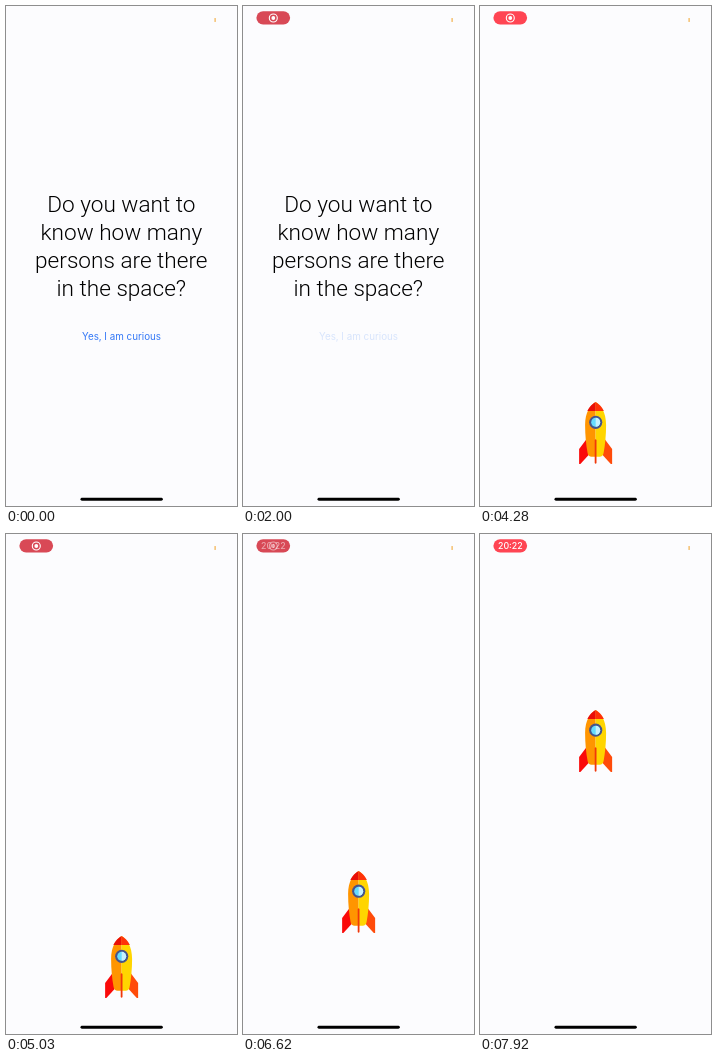
Animation, 231 px wide and 500 px high, one loop 8000 ms. Source, as an HTML page with a canvas:

```html
<!DOCTYPE html>
<html lang="en">
<head>
<meta charset="utf-8">
<title>Rocket</title>
<style>
html, body { margin: 0; width: 100%; height: 100%; overflow: hidden; background: #fcfcfe; }
canvas { display: block; width: 231px; height: 500px; }
</style>
</head>
<body>
<canvas id="stage"></canvas>
<script>
const W = 231, H = 500, LOOP = 8000;
const CUT = 3400; // question gives way to the rocket
const canvas = document.getElementById('stage');
const ctx = canvas.getContext('2d');
const scale = window.devicePixelRatio || 1;
canvas.width = Math.round(W * scale);
canvas.height = Math.round(H * scale);

const LINES = ['Do you want to', 'know how many', 'persons are there', 'in the space?'];

// time in ms, y of the rocket's tip
const PATH = [
  [3400, 409], [3580, 389], [3900, 403], [4280, 396], [4700, 404], [5070, 401],
  [5680, 375], [5780, 371], [5960, 343], [6300, 341], [6620, 337], [6800, 303],
  [7640, 203], [7920, 176], [8000, 167]
];

const clamp = x => Math.min(1, Math.max(0, x));
const ramp = (t, a, b) => {
  const x = clamp((t - a) / (b - a));
  return x * x * (3 - 2 * x);
};
const mix = (a, b, k) => a + (b - a) * k;

function slope(i) {
  const a = PATH[Math.max(0, i - 1)], b = PATH[Math.min(PATH.length - 1, i + 1)];
  return (b[1] - a[1]) / (b[0] - a[0]);
}

function rocketY(t) {
  let i = 0;
  while (i < PATH.length - 2 && t >= PATH[i + 1][0]) i++;
  const [t0, y0] = PATH[i], [t1, y1] = PATH[i + 1];
  const d = t1 - t0, u = (t - t0) / d, v = 1 - u;
  return y0 * (1 + 2 * u) * v * v + y1 * u * u * (3 - 2 * u)
    + d * u * v * (slope(i) * v - slope(i + 1) * u);
}

function pill(x, y, w, h, color) {
  ctx.fillStyle = color;
  ctx.beginPath();
  ctx.roundRect(x, y, w, h, h / 2);
  ctx.fill();
}

function disc(x, y, r, color) {
  ctx.fillStyle = color;
  ctx.beginPath();
  ctx.arc(x, y, r, 0, Math.PI * 2);
  ctx.fill();
}

function shape(path, color) {
  ctx.fillStyle = color;
  ctx.fill(new Path2D(path));
}

function text(str, x, y, font, color) {
  ctx.font = font;
  ctx.fillStyle = color;
  ctx.textAlign = 'center';
  ctx.fillText(str, x, y);
}

function statusBar(t) {
  pill(208.5, 12, 1.2, 4, '#f3b04a');
  const shown = ramp(t, 10, 260);
  if (!shown) return;
  const u = (t + 3700) % 4000;
  const dim = ramp(u, 0, 800) - ramp(u, 2600, 3400);
  const rgb = [mix(255, 216, dim), mix(69, 73, dim), mix(83, 86, dim)].map(Math.round);
  ctx.globalAlpha = shown;
  pill(13.4, 5.2, 33.7, 13.3, `rgb(${rgb})`);

  const clock = ramp(t, 6350, 6890);
  ctx.globalAlpha = shown * (1 - clock);
  ctx.strokeStyle = '#fff';
  ctx.lineWidth = 1.1;
  ctx.beginPath();
  ctx.arc(30.3, 12, 4, 0, Math.PI * 2);
  ctx.stroke();
  disc(30.3, 12, 1.9, '#fff');
  ctx.globalAlpha = shown * clock;
  text('20:22', 30.3, 15.1, '500 8.8px Inter, sans-serif', '#fff');
  ctx.globalAlpha = 1;
}

function question(t) {
  LINES.forEach((line, i) =>
    text(line, 115.3, 205.7 + 28 * i, '300 22.6px Roboto, sans-serif', '#000'));
  const pressed = ramp(t, 1780, 1960) - ramp(t, 2500, 3000);
  ctx.globalAlpha = 1 - 0.82 * pressed;
  text('Yes, I am curious', 115.5, 334.2, '400 9.8px Inter, sans-serif', '#3478f6');
  ctx.globalAlpha = 1;
}

// drawn around x = 0 with its tip at y = 0
function rocket(y) {
  ctx.save();
  ctx.translate(115.6, y);
  shape('M-9 37 L-16.5 47 V62 H-15.2 L-7 53 Z', '#fa0a0a');
  shape('M9 37 L16.5 47 V62 H15.2 L7 53 Z', '#ff4b0a');
  const half = 'C-5 3 -10.5 10 -10.5 23 C-10.5 33 -9.5 43 -8 51 Q-7.4 54.6 -4 54.8 H0 Z';
  const body = new Path2D('M0 0 ' + half);
  const mirrored = new Path2D();
  mirrored.addPath(body, { a: -1 });
  ctx.fillStyle = '#ff9500';
  ctx.fill(body);
  ctx.fillStyle = '#ffd500';
  ctx.fill(mirrored);
  shape('M0 0 C-3.5 2 -6.5 5 -8.3 9 H0 Z', '#e90f08');
  shape('M0 0 C3.5 2 6.5 5 8.3 9 H0 Z', '#ff3208');
  disc(0.1, 20.3, 6.6, '#47548a');
  disc(0.1, 20.3, 4.5, '#66dcff');
  shape('M0.1 15.8 A4.5 4.5 0 0 1 0.1 24.8 Z', '#c5f1ff');
  shape('M-0.9 38 Q0 36.6 0.9 38 V61 Q0 62.6 -0.9 61 Z', '#f0380a');
  ctx.restore();
}

function draw(t) {
  ctx.setTransform(scale, 0, 0, scale, 0, 0);
  ctx.fillStyle = '#fcfcfe';
  ctx.fillRect(0, 0, W, H);
  statusBar(t);
  if (t < CUT) question(t);
  else rocket(rocketY(t));
  pill(74.5, 491.8, 82.3, 2.9, '#000');
}

const start = performance.now();
function tick() {
  draw((performance.now() - start) % LOOP);
  requestAnimationFrame(tick);
}
tick();
</script>
</body>
</html>
```
